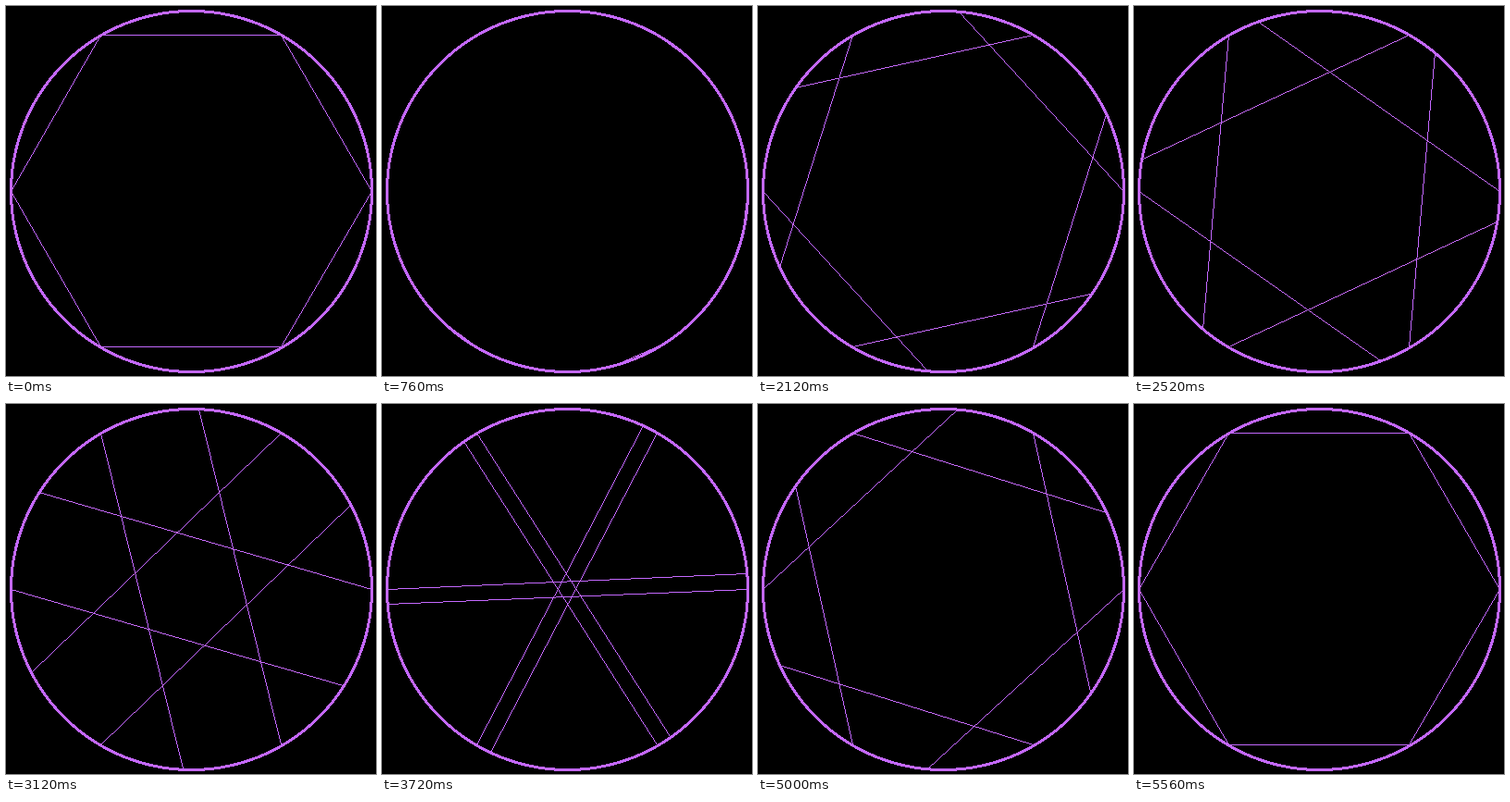
Animation of 400x400 px, one loop 5600 ms. Source, as an HTML page with a canvas:

```html
<!DOCTYPE html>
<html>
<head>
<meta charset="utf-8">
<style>
  html, body { margin: 0; width: 100%; height: 100%; overflow: hidden; background: #000; }
  canvas { display: block; width: 400px; height: 400px; }
</style>
</head>
<body>
<canvas id="stage" width="400" height="400"></canvas>
<script>
  const ctx = document.getElementById('stage').getContext('2d');
  const C = 200, R = 195, SIDES = 6;
  const STEP_MS = 40, STEPS = 140, TURN = 2.5;
  const COLOR = '#c468ff';

  const ring = makeRing();

  // Crisp three-pixel ring, built once
  function makeRing() {
    const layer = document.createElement('canvas');
    layer.width = layer.height = 400;
    const g = layer.getContext('2d');
    g.fillStyle = COLOR;
    for (let y = 0; y < 400; y++) {
      for (let x = 0; x < 400; x++) {
        if (Math.abs(Math.hypot(x - C, y - C) - R) < 1.5) g.fillRect(x, y, 1, 1);
      }
    }
    return layer;
  }

  function rimPoint(deg) {
    const a = deg * Math.PI / 180;
    return [
      Math.floor(C + R * Math.cos(a) + 1e-6),
      Math.floor(C - R * Math.sin(a) + 1e-6)
    ];
  }

  // One-pixel line without smoothing
  function line([x, y], [x2, y2]) {
    const dx = Math.abs(x2 - x), dy = -Math.abs(y2 - y);
    const sx = x < x2 ? 1 : -1, sy = y < y2 ? 1 : -1;
    let err = dx + dy;
    for (;;) {
      ctx.fillRect(x, y, 1, 1);
      if (x === x2 && y === y2) return;
      const e = 2 * err;
      if (e >= dy) { err += dy; x += sx; }
      if (e <= dx) { err += dx; y += sy; }
    }
  }

  // The sweep skips the moment when every chord hides inside the ring
  function sweep(step) {
    return -60 + TURN * (step < 22 ? step : step + 5);
  }

  function draw(ms) {
    const step = Math.floor(ms / STEP_MS) % STEPS;
    const offset = sweep(step);
    ctx.fillStyle = '#000';
    ctx.fillRect(0, 0, 400, 400);
    ctx.drawImage(ring, 0, 0);
    ctx.fillStyle = COLOR;
    for (let k = 0; k < SIDES; k++) {
      const base = k * 360 / SIDES;
      line(rimPoint(base), rimPoint(base + offset));
    }
  }

  const start = performance.now();
  function tick() {
    draw(performance.now() - start);
    requestAnimationFrame(tick);
  }
  tick();
</script>
</body>
</html>
```
